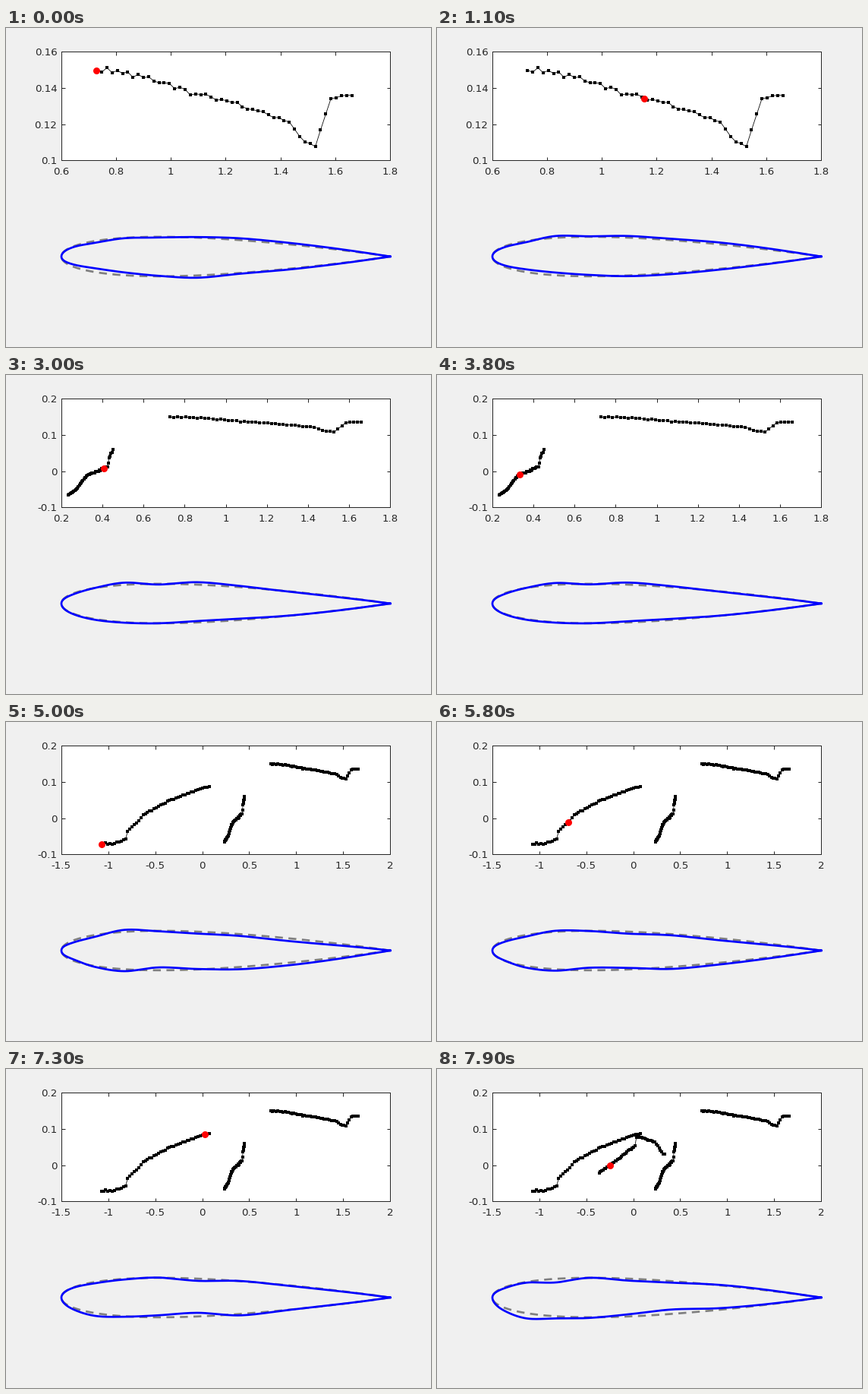
A matplotlib script that plays this animation: 560 px wide and 420 px high, repeating every 8 s.

```python
import numpy as np
import matplotlib.pyplot as plt
from matplotlib.animation import FuncAnimation

W, H, DPI = 560, 420, 80
PX = 72 / DPI            # points per pixel
STEPS, FRAMES = 25, 80   # frames per path, frames per loop
POINTS = 50              # samples per path
INK = (0.15, 0.15, 0.15)

plt.rcParams["font.family"] = "DejaVu Sans"
rng = np.random.default_rng(4)
n = np.arange(POINTS)


# --- upper plot ------------------------------------------------------------
def path(x0, x1, knots, noise):
    """Evenly spaced x; y in thousandths through (index, y) knots, with jitter."""
    y = np.interp(n, *np.transpose(knots))
    y += noise * (1 - n / 60) * rng.uniform(-1, 1, POINTS)
    return np.linspace(x0, x1, POINTS), y / 1000


paths = [
    path(0.7286, 1.660, [(0, 148), (3, 150), (11, 144), (18, 137), (25, 133),
                         (37, 121), (40, 110), (42, 108), (45, 134.5),
                         (49, 136)], 2),
    path(0.451, 0.235, [(0, 60), (4, 35), (6, 13), (18, -2), (27, -9),
                        (31, -18), (40, -49), (49, -66)], 2),
    path(-1.073, 0.0726, [(0, -69), (5, -71), (11, -57), (12, -38), (19, 8),
                          (30, 46), (41, 72), (49, 88)], 3),
    path(-0.363, 0.331, [(0, -21), (10, 4), (21, 36), (27, 54), (28, 75),
                         (30, 78), (42, 64), (48, 31), (49, 31)], 2),
]

# x limits, x step, y limits, y step
wide = (-1.5, 2.0, 0.5, -0.1, 0.2, 0.1)
views = [(0.6, 1.8, 0.2, 0.10, 0.16, 0.02),
         (0.2, 1.8, 0.2, -0.1, 0.2, 0.1), wide, wide]

# --- airfoil ---------------------------------------------------------------
CHORD, NOSE, MID = 433.2, 73, 300.9
s = (1 - np.cos(np.linspace(0, np.pi, 240))) / 2
half = 0.6 * CHORD * (0.2969 * np.sqrt(s) - 0.126 * s - 0.3516 * s**2
                      + 0.2843 * s**3 - 0.1036 * s**4)

# control stations crowd towards the nose: s = (r / 9) ** 1.5
r = 9 * s ** (2 / 3)
stations = np.array([0, 1, 2, 3, 4, 5, 6, 7, 9])


def smooth(v):
    """Cubic Hermite curve through the station values, zero at both ends."""
    v = np.array([0, *v, 0], float)
    m = np.gradient(v, stations)
    i = np.clip(np.searchsorted(stations, r) - 1, 0, len(stations) - 2)
    h = stations[i + 1] - stations[i]
    u = (r - stations[i]) / h
    return ((1 + 2 * u) * (1 - u)**2 * v[i] + u * (1 - u)**2 * h * m[i]
            + u * u * (3 - 2 * u) * v[i + 1] + u * u * (u - 1) * h * m[i + 1])


def pose(upper, lower):
    """Outward bulge of both surfaces in pixels."""
    return np.array([smooth(upper), smooth(lower)])


a0 = pose([-1, -2.4, -.5, -1, .8, 2.4, 2], [-3, -5, -3.7, -.6, 3, 1, 1])
a1 = pose([-1.4, -.5, 5.8, 2.6, 3.8, 1, 2.8], [-.4, -2, -3.4, -3.2, -1.5, 2.3, 1.3])
b = pose([-1, .2, 2.4, -.8, 2.7, 1.3, -.4], [.5, .8, .5, 0, -1.6, -1.4, -.2])
c0 = pose([-2.8, -2.2, 2.6, -.6, -2.6, -2.4, -3.6], [-1.8, 1.2, 2.5, -3.8, -.6, 3, 3.3])
c1 = pose([-1.2, -1.8, .2, 0, -2.8, -.6, -1.6], [1, 2.9, 1.2, -3, -3.5, 2.2, 1.2])
d = pose([-1.2, -1, -4.8, 0, -2.6, -2, .5], [4, 6.9, 2.8, .8, -2.8, -5.8, -2.2])

# each path moves linearly: pose at its start, and a later (time, pose)
moves = [(a0, 1, a1), (1.3 * b, 13 / 24, b), (c0, 2 / 3, c1), (1.25 * d, 1 / 6, d)]


def outline(bulge):
    up, low = half + bulge
    x = NOSE + CHORD * s
    return (np.concatenate([x[::-1], x[1:]]),
            np.concatenate([MID - up[::-1], MID + low[1:]]))


# --- stage -----------------------------------------------------------------
fig = plt.figure(figsize=(W / DPI, H / DPI), dpi=DPI, facecolor="#f0f0f0")

LEFT, RIGHT, TOP, BOTTOM = 72.8, 506.2, 31.2, 174.4
ax = fig.add_axes([LEFT / W, 1 - BOTTOM / H, (RIGHT - LEFT) / W, (BOTTOM - TOP) / H])
ax.tick_params(direction="in", top=True, right=True, length=4.5 * PX,
               width=PX, color=INK, labelcolor=INK, labelsize=13.33 * PX)
ax.tick_params(axis="x", pad=8.5 * PX)
ax.tick_params(axis="y", pad=5.3 * PX)
for side in ax.spines.values():
    side.set(color=INK, linewidth=PX)

lines = [ax.plot(x, y, "k-s", lw=0.8 * PX, ms=3.1 * PX, mew=0)[0]
         for x, y in paths]
dot, = ax.plot([], [], "o", color="r", ms=9 * PX, mew=0, zorder=5)

wing = fig.add_axes([0, 0, 1, 1])
wing.set(xlim=(0, W), ylim=(H, 0))
wing.axis("off")
wing.plot(*outline(np.zeros((2, s.size))), color="0.5", lw=2.7 * PX,
          dashes=(10.4 / 2.7, 7.4 / 2.7))
skin, = wing.plot([], [], color="b", lw=2.7 * PX, solid_joinstyle="round")


def ticks(lo, hi, step):
    vals = [round(v, 2) + 0.0 for v in np.arange(lo, hi + step / 2, step)]
    return vals, [f"{v:g}" for v in vals]


def set_view(x0, x1, dx, y0, y1, dy):
    ax.set_xticks(*ticks(x0, x1, dx))
    ax.set_yticks(*ticks(y0, y1, dy))
    ax.set(xlim=(x0, x1), ylim=(y0, y1))


def draw(frame):
    k, step = divmod(frame, STEPS)
    t = step / (STEPS - 1)
    set_view(*views[k])
    for i, line in enumerate(lines):
        line.set_visible(i <= k)

    at = t * (POINTS - 1)
    dot.set_data(*([np.interp(at, n, v)] for v in paths[k]))

    start, t1, later = moves[k]
    skin.set_data(*outline(start + (later - start) * t / t1))
    return [dot, skin, *lines]


anim = FuncAnimation(fig, draw, frames=FRAMES, interval=100, repeat=True)
plt.show()
```
